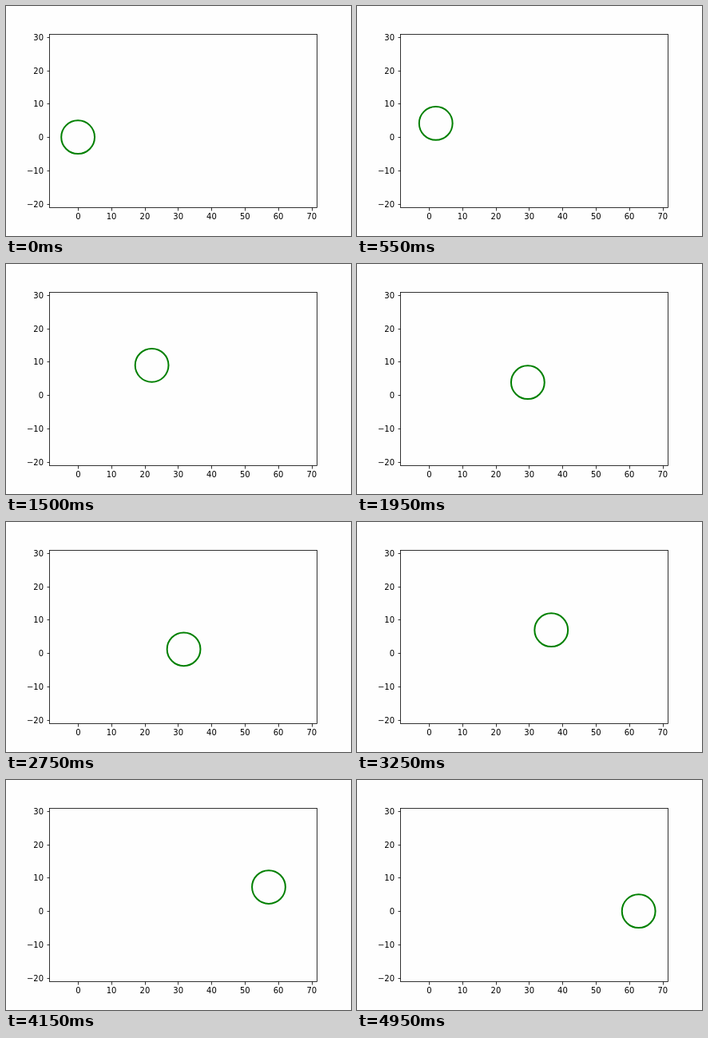
Animation, 432 px wide and 288 px high, one loop 5000 ms. Source, as an HTML page:

```html
<!DOCTYPE html>
<html lang="en">
<head>
<meta charset="utf-8">
<title>Rolling circle</title>
<style>
  html, body { margin: 0; width: 100%; height: 100%; overflow: hidden; background: #fefefe; }
  svg { display: block; width: 432px; height: 288px; }
  text { font: 10px "DejaVu Sans", sans-serif; fill: #000; }
  .axis { fill: none; stroke: #000; stroke-width: .8; }
  .ring { fill: none; stroke: #008000; stroke-width: 2; stroke-linecap: square; }
</style>
</head>
<body>
<svg viewBox="0 0 432 288">
  <g id="axes"><rect class="axis" x="54.5" y="35.5" width="335" height="217"/></g>
  <path id="ring" class="ring"/>
</svg>
<script>
  const LOOP = 5000, STEPS = 100, R = 5;
  const axes = document.getElementById('axes');
  const ring = document.getElementById('ring');

  // Equal-aspect view: the circle's full sweep plus 5% margins on each side
  const span = 4 * Math.PI * R + 2 * R;
  const scale = 334.8 / (span * 1.1);
  const px = x => 54 + (x + R + span * 0.05) * scale;
  const py = y => 143.28 - (y - R) * scale;

  function add(tag, attrs, content = '') {
    const el = document.createElementNS('http://www.w3.org/2000/svg', tag);
    for (const key in attrs) el.setAttribute(key, attrs[key]);
    el.textContent = content;
    axes.appendChild(el);
  }

  const label = v => String(v).replace('-', '\u2212');

  for (let v = 0; v <= 70; v += 10) {
    const x = Math.round(px(v));
    add('path', { class: 'axis', d: `M${x + 0.5} 252.5V256.5` });
    add('text', { x: px(v) + 0.2, y: 267, 'text-anchor': 'middle' }, label(v));
  }
  for (let v = -20; v <= 30; v += 10) {
    const y = Math.round(py(v));
    add('path', { class: 'axis', d: `M54.5 ${y + 0.5}H51.5` });
    add('text', { x: 47, y: y + 4, 'text-anchor': 'end' }, label(v));
  }

  // The centre follows two arches of a cycloid, in discrete steps
  function draw(ms) {
    const step = Math.floor((ms % LOOP) / (LOOP / STEPS));
    const a = 4 * Math.PI * step / (STEPS - 1);
    const x = px(R * (a - Math.sin(a)));
    const y = py(R * (1 - Math.cos(a)));
    const r = R * scale;
    ring.setAttribute('d',
      `M${x + r} ${y}A${r} ${r} 0 0 0 ${x - r} ${y}A${r} ${r} 0 0 0 ${x + r} ${y}`);
  }

  function tick() {
    draw(performance.now());
    requestAnimationFrame(tick);
  }
  tick();
</script>
</body>
</html>
```
